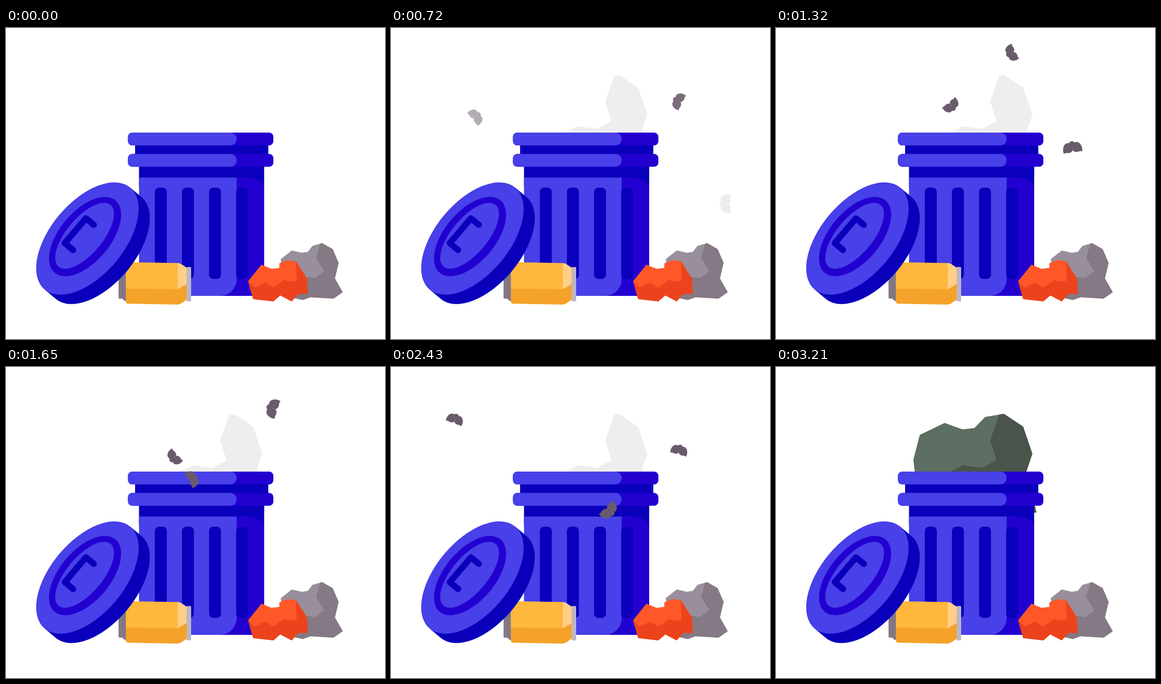
Recreate the animation shown at these times as an HTML page. Size 825x678 px, loop 4500 ms.

```html
<!DOCTYPE html>
<html lang="en">
<head>
<meta charset="utf-8">
<title>Trash can</title>
<style>
  html, body { margin: 0; width: 100%; height: 100%; overflow: hidden; background: #fff; }
  svg { display: block; width: 100vw; height: 100vh; }
  .light { fill: #4840e8; }
  .mid { fill: #2200d0; }
  .dark { fill: #0a00bb; }
</style>
</head>
<body>
<svg viewBox="0 0 825 678">
  <defs>
    <path id="bagShape" d="M299 202 313 148 367 122 406 136 432 133 455 109 496 102 538 130 558 189 545 228 567 317 500 324H310L302 228Z"/>
    <path id="bagShade" d="M486 104 496 102 538 130 558 189 545 228 567 317 520 324 380 228 407 214 448 220 480 203 466 160Z"/>
    <path id="wing" d="M0 7C-4 12-9 12-13 11-16 10-18 11-20 12-23 4-19-8-12-10-8-11-4-10 0-5Z"/>
    <g id="fly" fill="#6a5b6c">
      <use href="#wing"/>
      <use href="#wing" transform="scale(-1 1)"/>
      <circle cy="-7" r="6.5"/>
    </g>
    <g id="rim">
      <rect class="mid" x="265.500" width="316.500" height="28" rx="9"/>
      <path class="light" d="M274.500 0H488a14 14 0 0 1 0 28H274.500a9 9 0 0 1-9-9V9a9 9 0 0 1 9-9Z"/>
    </g>
    <rect id="slot" class="dark" y="348" width="26" height="199" rx="9"/>
  </defs>

  <g id="bag" fill="#5d6e62">
    <use href="#bagShape"/>
    <use href="#bagShade" fill="#4b544a"/>
  </g>
  <g id="blank" fill="#fff">
    <use href="#bagShape"/>
    <use href="#bagShade" fill="#eee"/>
  </g>

  <g id="can">
    <path class="dark" d="M289.500 300H562V345H289.500Z"/>
    <path class="mid" d="M460 326H522Q550 326 562 345V584H460Z"/>
    <path class="light" d="M289.500 326H502V548A36 36 0 0 1 466 584H289.500Z"/>
    <use href="#slot" x="324"/>
    <use href="#slot" x="383"/>
    <use href="#slot" x="442"/>
    <use href="#slot" x="501"/>
    <path class="dark" d="M281 250H571V280H281Z"/>
    <use href="#rim" y="228"/>
    <use href="#rim" y="274.500"/>
  </g>

  <g id="drink">
    <path fill="#847985" d="M254 515H263V597L254 592Z"/>
    <rect x="245" y="515" width="10" height="75" rx="2" fill="#847985"/>
    <path stroke="#766b79" d="M254.500 530V589"/>
    <path fill="#ffb73d" d="M261 515Q261 510.500 266 510.500L376 512.500V571H261Z"/>
    <path fill="#ffcf87" d="M374 512.500Q379 512.500 382 515L394 523V571H374Z"/>
    <path fill="#f4a229" d="M261 568 374 569.500 394 558V592L382 600Q378 603 373 603L266 601Q261 601 261 596Z"/>
    <rect x="393" y="521" width="10" height="75" rx="2" fill="#bfb6c4"/>
  </g>

  <g id="lid">
    <g transform="translate(177.200 459) rotate(40)">
      <path class="dark" d="M0-145H32A79.500 145 0 0 1 32 145H0Z"/>
      <ellipse class="light" rx="80" ry="145"/>
      <ellipse class="mid" cx="-6.700" rx="55" ry="103"/>
      <ellipse class="light" cx="-8.500" cy="-.7" rx="39" ry="88"/>
    </g>
    <path d="M191 429 174 415 128 469 146 484" fill="none" stroke="#0a00bb" stroke-width="13.500" stroke-linecap="round" stroke-linejoin="round"/>
  </g>

  <g id="paper">
    <path fill="#998e9b" d="M598 504 622 485 644 490 657 488 667 475 688 469 711 482 724 512 716 546 733 576 713 590 663 587 646 593 610 585Z"/>
    <path fill="#847985" d="M684 470 688 469 711 482 724 512 716 546 733 576 713 590 663 587 646 593 610 585 630 540 673 545 693 530 675 502Z"/>
    <path fill="#ff5728" d="M527 552 556 516 578 525 595 523 595 513 613 506 632 509 655 546 657 580 636 580 622 596 597 583 582 596 538 591Z"/>
    <path fill="#ec431c" d="M527 552 541 566 564 555 582 566 606 549 615 553 633 551 631 509 655 546 657 580 636 580 622 596 597 583 582 596 538 591Z"/>
  </g>

  <use class="fly" href="#fly"/>
  <use class="fly" href="#fly"/>
  <use class="fly" href="#fly"/>
</svg>
<script>
const LOOP = 4500, STEP = 30;
const LEG = 300, TAKEOFF = 420;
const clamp = v => Math.max(0, Math.min(1, v));
const bag = document.getElementById('bag');
const blank = document.getElementById('blank');
const flies = document.querySelectorAll('.fly');

// Each fly passes one waypoint per leg.
const routes = [
  '780,215 625,159 550,100 512,55 380,185 235,293 140,195 157,85 292,44 405,118',
  '130,222 185,193 280,100 382,170 400,245 489,172 600,220 634,162 647,128 545,104',
  '790,372 728,383 628,372 645,260 590,95 469,130 448,256 500,331 647,356 708,213 650,60'
].map(route => route.split(' ').map(point => point.split(',').map(Number)));

// Catmull-Rom curve through the waypoints.
function position(route, t) {
  const s = (t - TAKEOFF) / LEG, i = Math.floor(s), u = s - i;
  const at = k => route[Math.max(0, Math.min(route.length - 1, k))];
  return [0, 1].map(axis => {
    const [a, b, c, d] = [-1, 0, 1, 2].map(k => at(i + k)[axis]);
    return b + u / 2 * (c - a + u * (2 * a - 5 * b + 4 * c - d + u * (3 * (b - c) + d - a)));
  });
}

function drawFly(fly, i, t) {
  const start = 475 + 108 * i, end = 3010 + 100 * i;
  const [x, y] = position(routes[i], t), [nx, ny] = position(routes[i], t + 1);
  const angle = Math.atan2(nx - x, y - ny) * 180 / Math.PI;
  const size = i < 2 ? .88 : 1;
  fly.setAttribute('opacity', Math.min(clamp((t - start) / 275), clamp((end - t) / 120)));
  fly.setAttribute('transform', `translate(${x} ${y}) rotate(${angle}) scale(${size})`);
}

function draw() {
  const t = Math.floor(performance.now() % LOOP / STEP) * STEP;
  bag.setAttribute('opacity', t >= 2910 ? 1 : 0);
  blank.setAttribute('opacity', Math.min(clamp((t - 150) / 150), clamp((3090 - t) / 150)));
  flies.forEach((fly, i) => drawFly(fly, i, t));
  requestAnimationFrame(draw);
}
draw();
</script>
</body>
</html>
```
